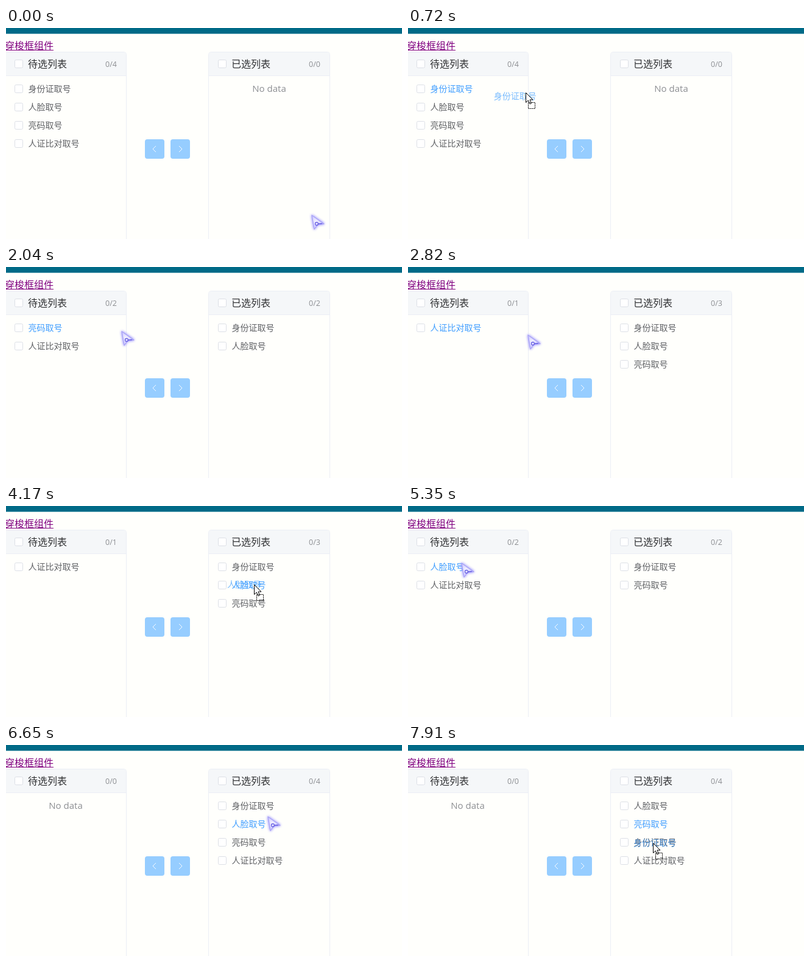
An HTML page with a canvas that plays this animation: 650x347 px, repeating every 8 s.

```html
<!DOCTYPE html>
<html lang="zh-CN">
<head>
<meta charset="utf-8">
<title>穿梭框组件</title>
<style>
html, body { margin: 0; width: 100%; height: 100%; overflow: hidden; background: #fffffc; }
canvas { display: block; }
</style>
</head>
<body>
<canvas id="stage" width="650" height="347"></canvas>
<script>
const ctx = document.getElementById('stage').getContext('2d');
const LOOP = 8000;
const CJK = '"Noto Sans CJK SC", "Noto Sans CJK", sans-serif';
const LATIN = '"Open Sans", "Noto Sans", sans-serif';
const PAPER = '#fffffc', BLUE = '#409eff', GREY = '#606266', PALE_GREY = '#8c8e92';
const LABELS = ['身份证取号', '人脸取号', '亮码取号', '人证比对取号'];
const PANELS = [{ x: -2, title: '待选列表' }, { x: 332, title: '已选列表' }];
const PANEL_WIDTH = 200, ROW_TOP = 85, ROW_HEIGHT = 30, TEXT_INSET = 38;

const rowAt = y => Math.floor((y - ROW_TOP) / ROW_HEIGHT);
const rowMiddle = row => ROW_TOP + ROW_HEIGHT * (row + 0.5);
const sideAt = x => PANELS.findIndex(p => x >= p.x && x < p.x + PANEL_WIDTH);
const smooth = k => k * k * (3 - 2 * k);

// The pointer rests between gestures; a drag carries whatever lies under it.
const START = { x: 502, y: 308 };
const HOME = { x: 88, y: 94 };
const right = (row, x = 402) => ({ x, y: rowMiddle(row) });
const move = (start, end, to) => ({ start, end, to });
const drag = (start, end, to) => ({ start, end, to, carries: true });

const GESTURES = [
  move(50, 410, HOME),
  drag(570, 960, right(1)), move(960, 1300, HOME),
  drag(1440, 1800, right(1)), move(1800, 2190, HOME),
  drag(2260, 2610, right(1.5)), move(2610, 2960, HOME),
  move(3420, 3860, right(1, 414)),
  drag(4130, 4600, HOME), move(4600, 4970, right(0)),
  move(5040, 5350, HOME),
  drag(5490, 5930, right(1)), move(5930, 6290, HOME),
  drag(6350, 6560, right(2.7)), move(6560, 6650, right(0.6, 430)), move(6650, 7090, right(0)),
  drag(7160, LOOP, right(2.1))
];

function stateAt(t) {
  const lists = [[0, 1, 2, 3], []];
  const itemAt = ({ x, y }) => lists[sideAt(x)]?.[rowAt(y)];
  let pointer = START, ghost = null, hovered;
  for (const { start, end, to, carries } of GESTURES) {
    if (t < start) break;
    const from = pointer, active = t < end;
    const k = smooth(Math.min(1, (t - start) / (end - start)));
    pointer = { x: from.x + (to.x - from.x) * k, y: from.y + (to.y - from.y) * k };
    if (!carries) continue;

    const source = sideAt(from.x), row = rowAt(from.y);
    const side = sideAt(pointer.x), index = Math.max(0, rowAt(pointer.y));
    const item = lists[source][row];
    // Within its own list the item moves at once; elsewhere only when dropped.
    if (side === source || !active) {
      lists[source].splice(row, 1);
      lists[side].splice(index, 0, item);
    }
    if (active) {
      ghost = {
        item,
        x: PANELS[source].x + TEXT_INSET + pointer.x - from.x,
        y: rowMiddle(row) + pointer.y - from.y
      };
      hovered = side === source && index > row ? lists[side][index - 1] : item;
    }
  }
  if (!ghost) hovered = itemAt(pointer);
  return { lists, pointer, ghost, hovered };
}

function text(str, x, middle, size, color, family = CJK, align = 'left') {
  ctx.font = `${size}px ${family}`;
  ctx.fillStyle = color;
  ctx.textAlign = align;
  ctx.fillText(str, x, middle + size * 0.37);
}

function box(x, y, w, h, radius, fill, stroke) {
  ctx.beginPath();
  ctx.roundRect(x, y, w, h, radius);
  ctx.fillStyle = fill;
  ctx.fill();
  if (!stroke) return;
  ctx.lineWidth = 1;
  ctx.strokeStyle = stroke;
  ctx.stroke();
}

const checkbox = (x, middle) => box(x + 0.5, middle - 6.5, 13, 13, 2, '#fff', '#dcdfe6');

function drawPanel({ x, title }, items, hovered) {
  box(x + 0.5, 39.5, PANEL_WIDTH - 1, 330, 4, PAPER, '#ebeef5');
  box(x + 1, 40, PANEL_WIDTH - 2, 38, [3, 3, 0, 0], '#f5f7f9');
  ctx.fillStyle = '#ebeef5';
  ctx.fillRect(x, 78, PANEL_WIDTH, 1);
  checkbox(x + 16, 59);
  text(title, x + TEXT_INSET, 59.5, 16, '#303133');
  text(`0/${items.length}`, x + 184, 59.5, 12.5, PALE_GREY, LATIN, 'right');
  if (!items.length) text('No data', x + 100, 99.5, 15, PALE_GREY, LATIN, 'center');
  items.forEach((item, row) => {
    checkbox(x + 16, rowMiddle(row));
    text(LABELS[item], x + TEXT_INSET + 0.5, rowMiddle(row), 14, item === hovered ? BLUE : GREY);
  });
}

function drawButton(x, direction) {
  box(x, 183, 32, 32, 4, '#96cdff');
  const middle = x + 16 + direction * 0.5;
  ctx.beginPath();
  ctx.moveTo(middle - direction * 2.5, 194);
  ctx.lineTo(middle + direction * 2.5, 199);
  ctx.lineTo(middle - direction * 2.5, 204);
  ctx.strokeStyle = '#fff';
  ctx.lineWidth = 0.9;
  ctx.stroke();
}

const GLOW_ARROW = new Path2D('M0 0 L20 14 L9.5 15 L4 23 Z');
const GLOW_EYE = new Path2D('M10.5 14 A2.5 2.5 0 1 1 5.5 14 A2.5 2.5 0 1 1 10.5 14 L17 13.5');
const PLAIN_ARROW = new Path2D('M.5 .5 V16.5 L4.3 13 L7 19 L9.6 17.8 L7 12 H12 Z');

function drawPointer({ x, y }, dragging) {
  ctx.save();
  ctx.translate(Math.round(x), Math.round(y));
  ctx.lineWidth = 1;
  ctx.lineJoin = 'round';
  if (dragging) {
    ctx.fillStyle = '#fff';
    ctx.strokeStyle = '#000';
    ctx.fill(PLAIN_ARROW);
    ctx.stroke(PLAIN_ARROW);
    ctx.setLineDash([2, 1]);
    ctx.strokeRect(4.5, 16.5, 11, 10);
  } else {
    ctx.shadowColor = '#8f86ff';
    ctx.shadowBlur = 4;
    ctx.fillStyle = '#f8f7ff';
    ctx.strokeStyle = '#a8a2f6';
    ctx.lineWidth = 1.3;
    ctx.fill(GLOW_ARROW);
    ctx.stroke(GLOW_ARROW);
    ctx.shadowBlur = 0;
    ctx.strokeStyle = '#6a62e4';
    ctx.stroke(GLOW_EYE);
  }
  ctx.restore();
}

function draw(t) {
  const { lists, pointer, ghost, hovered } = stateAt(t);
  ctx.fillStyle = PAPER;
  ctx.fillRect(0, 0, 650, 347);
  ctx.fillStyle = '#006a87';
  ctx.fillRect(0, 0, 650, 9.5);
  text('穿梭框组件', -2, 29.5, 16, '#800080');
  ctx.fillRect(0, 36, 78, 1);
  PANELS.forEach((panel, side) => drawPanel(panel, lists[side], hovered));
  drawButton(228, -1);
  drawButton(270, 1);
  if (ghost) {
    ctx.globalAlpha = 0.7;
    text(LABELS[ghost.item], ghost.x, ghost.y, 14, BLUE);
    ctx.globalAlpha = 1;
  }
  drawPointer(pointer, ghost);
}

const began = performance.now();
function frame() {
  draw((performance.now() - began) % LOOP);
  requestAnimationFrame(frame);
}
frame();
</script>
</body>
</html>
```
